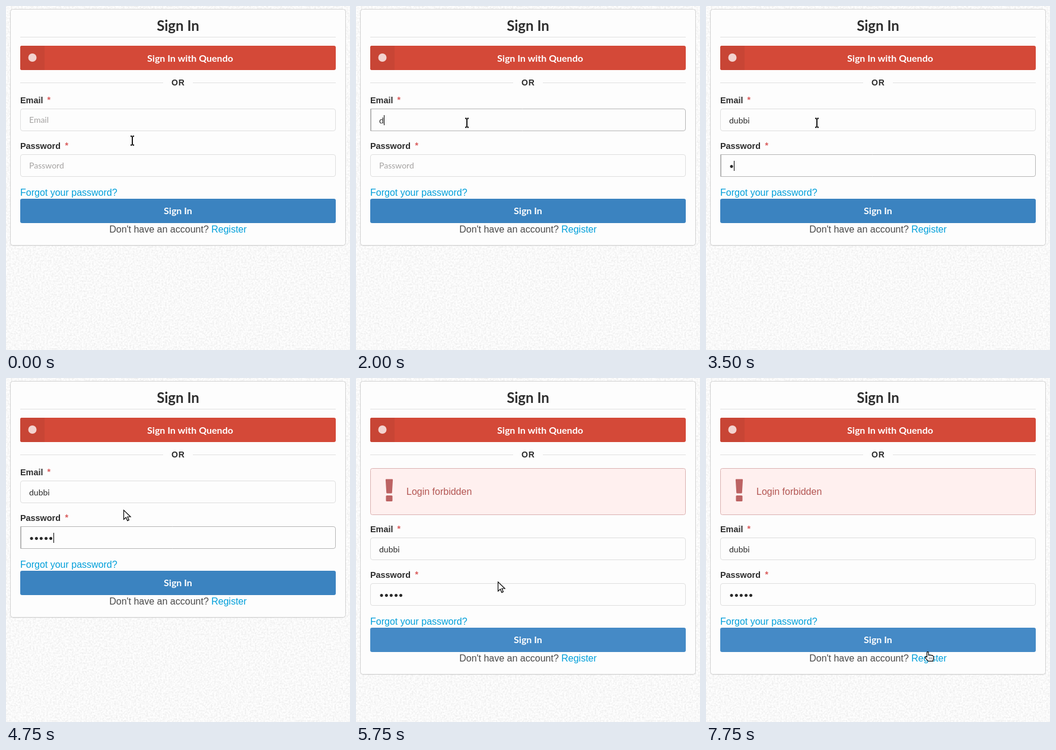
An HTML page for the animation above (8000 ms loop, 580 px wide and 580 px high).

```html
<!DOCTYPE html>
<html lang="en">
<head>
<meta charset="utf-8">
<title>Sign In</title>
<style>
html, body { margin: 0; width: 100%; height: 100%; overflow: hidden; background: #fefefe; }
svg { position: absolute; left: 0; top: 0; width: 580px; height: 580px; }
text { font: 16px "Liberation Sans", Arial, sans-serif; fill: #4a4a4a; }
.lato { font: bold 16px Lato, sans-serif; fill: #fff; text-anchor: middle; }
.title { font-size: 24px; fill: #2d2d2d; }
.label { font-weight: bold; font-size: 14.4px; fill: #2d2d2d; }
.star { fill: #d95c5c; }
.link { fill: #009fda; }
.rule { stroke: #e0e0e0; }

/* One 8 s timeline of 32 hard steps, 3.125% each */
.t { animation: 8s step-end infinite; }
.drop { animation-name: drop; }
.card { height: 398px; animation-name: card; }
.error { opacity: 0; animation-name: error; }
.button { fill: #3b83c0; animation-name: hover; }
@keyframes drop { 71.875%, to { transform: translateY(96px); } }
@keyframes card { 71.875%, to { height: 494px; } }
@keyframes error { 71.875%, to { opacity: 1; } }
@keyframes hover {
  6.25%, 65.625%, 93.75%, to { fill: #458ac6; }
  9.375%, 75% { fill: #3b83c0; }
}

.field {
  position: absolute; left: 24px; box-sizing: border-box; width: 532px; height: 38px;
  border: 1px solid #dedede; border-radius: 4px; background: #fdfdfd;
  font: 14px/17px Lato, sans-serif; color: #2a2a2a;
}
.field div { position: absolute; left: 14px; top: 10px; height: 17px; white-space: nowrap; display: flex; }
.field .hint { top: 9px; color: #a5a3a2; }
.field i { font-style: normal; font-size: 0; }
.field b { width: 1px; height: 17px; background: #000; opacity: 0; }
.email { top: 173px; }
.pass { top: 250px; }
.email > .t { animation-name: emailBox; }
.email .hint { animation-name: emailHint; }
.email b { animation-name: emailCaret; }
.pass .hint { animation-name: passHint; }
.pass b { animation-name: passCaret; }
.email.t { animation-name: emailFocus; }
.pass.t { animation-name: drop, passFocus; }
@keyframes emailFocus {
  15.625%, 37.5% { border-color: #cacaca; border-radius: 0 4px 4px 0; box-shadow: inset 1px 0 #dcdcdc; }
  18.75% { border-color: #b6b6b6; border-radius: 0 4px 4px 0; box-shadow: inset 1px 0 #b6b6b6; }
  40.625%, to { border-color: #dedede; border-radius: 4px; box-shadow: none; }
}
@keyframes passFocus {
  37.5% { border-color: #cacaca; border-radius: 0 4px 4px 0; box-shadow: inset 1px 0 #dcdcdc; }
  40.625% { border-color: #b6b6b6; border-radius: 0 4px 4px 0; box-shadow: inset 1px 0 #b6b6b6; }
  71.875%, to { border-color: #dedede; border-radius: 4px; box-shadow: none; }
}
.email.t { animation-name: drop, emailFocus; }
@keyframes emailHint { 25%, to { opacity: 0; } }
@keyframes passHint { 43.75%, to { opacity: 0; } }
@keyframes emailCaret { 18.75% { opacity: 1; } 37.5%, to { opacity: 0; } }
@keyframes passCaret { 37.5% { opacity: 1; } 71.875%, to { opacity: 0; } }

.email i:nth-child(1) { animation-name: e1; }
.email i:nth-child(2) { animation-name: e2; }
.email i:nth-child(3), .email i:nth-child(4) { animation-name: e3; }
.email i:nth-child(5) { animation-name: e4; }
.pass i:nth-child(1) { animation-name: p1; }
.pass i:nth-child(2) { animation-name: p2; }
.pass i:nth-child(3), .pass i:nth-child(4) { animation-name: p3; }
.pass i:nth-child(5) { animation-name: p4; }
@keyframes e1 { 25%, to { font-size: 14px; } }
@keyframes e2 { 28.125%, to { font-size: 14px; } }
@keyframes e3 { 31.25%, to { font-size: 14px; } }
@keyframes e4 { 34.375%, to { font-size: 14px; } }
@keyframes p1 { 43.75%, to { font-size: 14px; } }
@keyframes p2 { 46.875%, to { font-size: 14px; } }
@keyframes p3 { 50%, to { font-size: 14px; } }
@keyframes p4 { 53.125%, to { font-size: 14px; } }

.mouse { transform: translate(213px, 227px); animation-name: mouse; }
.beam { animation-name: beam; }
.hand { opacity: 0; animation-name: hand; }
.arrow { opacity: 0; animation-name: arrow; }
@keyframes mouse {
  3.125% { transform: translate(238px, 290px); }
  6.25% { transform: translate(262px, 343px); }
  9.375% { transform: translate(270px, 397px); }
  12.5% { transform: translate(222px, 303px); }
  15.625% { transform: translate(187px, 197px); }
  59.375% { transform: translate(198px, 222px); }
  62.5% { transform: translate(216px, 269px); }
  65.625% { transform: translate(236px, 334px); }
  68.75% { transform: translate(239px, 343px); }
  81.25% { transform: translate(110px, 222px); }
  84.375% { transform: translate(21px, 141px); }
  87.5% { transform: translate(74px, 196px); }
  90.625% { transform: translate(205px, 322px); }
  93.75% { transform: translate(333px, 437px); }
  96.875%, to { transform: translate(372px, 463px); }
}
@keyframes beam { 0%, 15.625%, 62.5% { opacity: 1; } 3.125%, 59.375%, 65.625%, to { opacity: 0; } }
@keyframes hand { 6.25%, 65.625%, 93.75%, to { opacity: 1; } 0%, 9.375%, 71.875% { opacity: 0; } }
@keyframes arrow {
  3.125%, 9.375%, 59.375%, 71.875% { opacity: 1; }
  0%, 6.25%, 15.625%, 62.5%, 93.75%, to { opacity: 0; }
}
</style>
</head>
<body>
<svg viewBox="0 0 580 580">
  <filter id="paper" x="0" y="0" width="1" height="1" color-interpolation-filters="sRGB">
    <feTurbulence type="fractalNoise" baseFrequency=".35" numOctaves="3" seed="4"/>
    <feColorMatrix values="0 0 0 0 0  0 0 0 0 0  0 0 0 0 0  .14 0 0 0 -.05"/>
  </filter>
  <rect width="580" height="580" filter="url(#paper)"/>
  <rect class="t card" x="7.5" y="6.5" width="565" rx="4" fill="none" stroke="#000" stroke-opacity=".05"/>
  <rect class="t card" x="7.5" y="5.5" width="565" rx="4" fill="#fdfdfd" stroke="#d2d2d2"/>

  <text class="lato title" x="290" y="42">Sign In</text>
  <path class="rule" d="M24 52.5H556M24 129.5H265M315 129.5H556"/>
  <rect x="24" y="67" width="532" height="41" rx="3" fill="#d44938"/>
  <path d="M65 67H27a3 3 0 0 0-3 3v35a3 3 0 0 0 3 3h38z" fill="#c84535"/>
  <circle cx="44.500" cy="87" r="7" fill="#f3d3cf"/>
  <text class="lato" x="310.500" y="94">Sign In with Quendo</text>
  <text class="label" x="290.300" y="134" text-anchor="middle" style="font-size:14px;letter-spacing:.7px">OR</text>

  <g class="t error">
    <rect x="24.500" y="152.500" width="531" height="78" rx="3" fill="#fff0ef" stroke="#dbb1b1"/>
    <path d="M51 170.500h10q1.200 0 1.100 1.200l-1.300 21.600q-.1 1.200-1.300 1.200h-7q-1.200 0-1.300-1.200l-1.300-21.600q-.1-1.200 1.100-1.200z" fill="#bc6363"/>
    <rect x="50.500" y="198" width="11" height="10" rx="1.500" fill="#bc6363"/>
    <text x="85" y="197" style="fill:#b35653">Login forbidden</text>
  </g>

  <g class="t drop">
    <text class="label" x="24" y="164">Email</text>
    <text class="label star" x="69.500" y="163">*</text>
    <text class="label" x="24" y="241">Password</text>
    <text class="label star" x="99.500" y="240">*</text>
    <text class="link" x="24" y="320">Forgot your password?</text>
    <rect class="t button" x="24" y="325" width="532" height="41" rx="3"/>
    <text class="lato" x="290" y="351">Sign In</text>
    <text x="290" y="382" text-anchor="middle">Don't have an account? <tspan class="link">Register</tspan></text>
  </g>
</svg>

<div class="field email t">
  <div class="hint t">Email</div>
  <div><i class="t">d</i><i class="t">u</i><i class="t">b</i><i class="t">b</i><i class="t">i</i><b class="t"></b></div>
</div>
<div class="field pass t">
  <div class="hint t">Password</div>
  <div><i class="t">•</i><i class="t">•</i><i class="t">•</i><i class="t">•</i><i class="t">•</i><b class="t"></b></div>
</div>

<svg viewBox="0 0 580 580">
  <g class="t mouse">
    <g class="t beam" fill="none">
      <path d="M-3-7.500H3M0-7.500V7.500M-3 7.500H3" stroke="#fff" stroke-width="4"/>
      <path d="M-3-7.500H-.5M.5-7.500H3M-3 7.500H-.5M.5 7.500H3M0-7V7" stroke="#000" stroke-width="1.800"/>
    </g>
    <path class="t arrow" d="M.5.800V16.500L4.300 13 6.800 18.600 9.300 17.500 6.900 12H12z" fill="#fff" stroke="#000" stroke-width="1.200"/>
    <g class="t hand" stroke="#000" stroke-width="1.200" stroke-linejoin="round">
      <path d="M.500 7.500V.500q0-1.800 1.400-1.800T3.300.500V4.500q1-1 2.600 0 1.300-.7 2.500.3 1.500-.4 2.400 1 .8.300.8 1.700v3.200L10.500 14.300H2.500L-2.300 8.800q-.6-1.300.5-1.900 1.100-.3 2.300.6z" fill="#fff"/>
      <path d="M4.500 8v3.500M6.700 8v3.500M8.900 8v3.500" stroke-width=".8" stroke="#555"/>
    </g>
  </g>
</svg>
</body>
</html>
```
